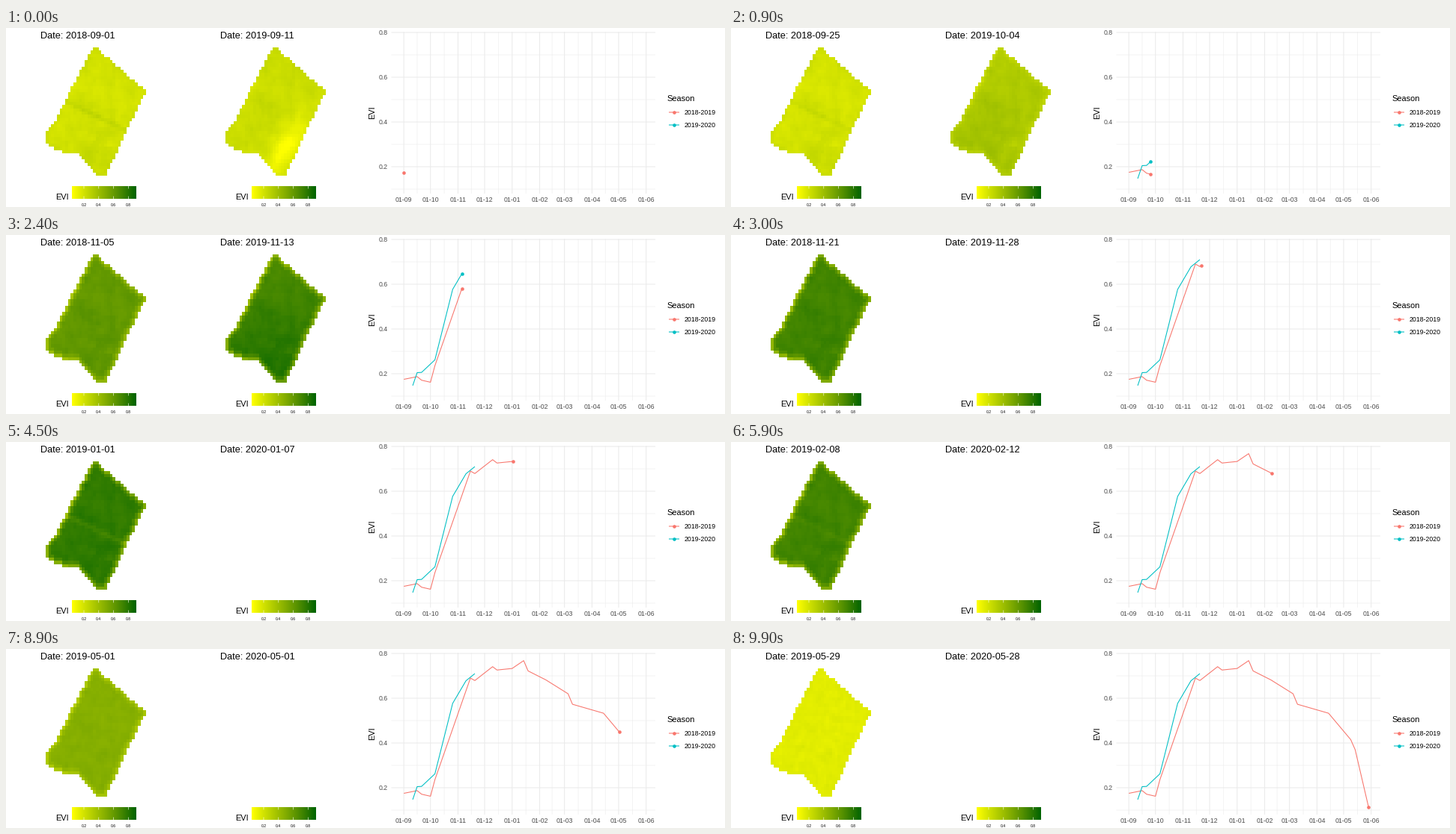
Write a matplotlib script that moves like this. It is 960 px wide and 240 px high and loops after 10000 ms.

```python
import numpy as np
import matplotlib.pyplot as plt
from matplotlib.animation import FuncAnimation
from matplotlib.path import Path

DPI, PT = 96, 0.75  # PT: points per pixel
FRAMES, INTERVAL = 100, 100
RED, TEAL = "#F8766D", "#00BFC4"
GRID, TICK = "#EBEBEB", "#4D4D4D"
plt.rcParams["font.family"] = "Liberation Sans"

# Turning points of each season: days since 1 September, EVI
SEASON_A = np.array([
    (0, .175), (15, .187), (20, .171), (30, .162), (35, .236), (75, .69),
    (80, .679), (100, .741), (105, .726), (122, .733), (135, .768),
    (140, .722), (160, .682), (185, .62), (190, .573), (225, .533),
    (250, .415), (255, .37), (270, .115)])
SEASON_B = np.array([(10, .147), (15, .205), (20, .206), (35, .262),
                     (55, .577), (70, .678), (80, .71)])

# Field outline and raster, in pixels
X0, Y0, CW, CH, COLS, ROWS = 53, 26, 3.72, 4.3, 36, 40
OUTLINE = [(118, 24), (180, 79), (188, 81), (188, 89), (181, 96),
           (133, 198.5), (124, 198.5), (97, 170), (66, 164), (53, 152),
           (52, 140), (61, 133), (114, 29)]
EVI_MIN, EVI_MAX = 0.04, 0.907


def evi_rgb(v):
    """Yellow to dark green."""
    t = np.clip((np.asarray(v) - EVI_MIN) / (EVI_MAX - EVI_MIN), 0, 1)
    return np.stack([(1 - t) * (1 + .3 * t * t), 1 - .61 * t, 0 * t], -1)


def erode(m):
    p = np.pad(m, 1)
    return m & p[:-2, 1:-1] & p[2:, 1:-1] & p[1:-1, :-2] & p[1:-1, 2:]


def noise(passes):
    a = rng.normal(size=gx.shape)
    for _ in range(passes):
        a = (2 * a + sum(np.roll(a, s, ax) for s in (-1, 1) for ax in (0, 1))) / 6
    return a / a.std()


def bump(cx, cy, sx, sy, lean=0):
    u, w = gx - cx, gy - cy
    return np.exp(-((u + lean * w) / sx) ** 2 - (w / sy) ** 2)


gx, gy = np.meshgrid(X0 + CW * (np.arange(COLS) + .5),
                     Y0 + CH * (np.arange(ROWS) + .5))
inside = Path(OUTLINE).contains_points(
    np.c_[gx.ravel(), gy.ravel()]).reshape(gx.shape)
core = erode(inside)
rim, ring = inside & ~core, core & ~erode(core)
left_side = gx < 118 - (gy - 26) * .25

# Share of the seasonal growth reached by each cell
vigour = np.full(gx.shape, 1.03)
vigour[ring] = .9
vigour[rim] = np.where(left_side, .46, .58)[rim]

rng = np.random.default_rng(4)
fine, broad, late = noise(1), noise(5), noise(1)
stripe = np.exp(-((gy - 98 - (gx - 80) * .49) / 4) ** 2)
dry_patch = bump(133, 160, 20, 38, lean=.45)
corner = bump(112, 178, 28, 24)


def field(mean, day):
    bare = min(mean, .17)
    fade = np.interp(day, [200, 270], [1, .2])
    texture = .013 * broad + .008 * fine + .015 * rim
    return (bare + .025 + (mean - bare) * vigour
            + texture * fade + .011 * late * (1 - fade))


def field_a(day):
    band = np.interp(day, [0, 81, 122, 200], [.06, 0, -.06, 0])
    low = np.interp(day, [38, 70], [.035, 0])
    return (field(np.interp(day, *SEASON_A.T), day)
            + band * stripe + low * corner)


def field_b(day):
    dry = np.interp(day, [10, 42], [.2, 0])
    slope = np.interp(day, [10, 46], [0, .05])
    return (field(np.interp(day + 6, *SEASON_B.T), day)
            - dry * dry_patch + slope * (gy - 110) / 60)


def px(day):
    return 531.2 + 1.185 * np.asarray(day)


def py(evi):
    return 246 - 300 * np.asarray(evi)


fig = plt.figure(figsize=(10, 2.5), dpi=DPI, facecolor="white")
ax = fig.add_axes([0, 0, 1, 1])
ax.axis("off")


def label(x, y, s, size, color="black", **kw):
    kw.setdefault("va", "baseline")
    return ax.text(x, y, s, fontsize=size * PT, color=color, **kw)


def line(xs, ys, color, width=1.07):
    return ax.plot(xs, ys, color=color, lw=width * PT, snap=False,
                   solid_capstyle="butt")[0]


def dot(x, y, color):
    return ax.plot(x, y, "o", color=color, ms=4.6 * PT, mew=0, snap=False)[0]


def image(rgb, x0, x1, y0, y1):
    return ax.imshow(rgb, extent=(x0, x1, y1, y0), aspect="auto",
                     interpolation="nearest")


def map_panel(dx):
    title = label(46 + dx, 14, "", 12.8)
    im = image(np.zeros((ROWS, COLS, 4)), X0 + dx, X0 + dx + COLS * CW,
               Y0, Y0 + ROWS * CH)
    label(66 + dx, 230, "EVI", 11)
    image(evi_rgb(np.linspace(EVI_MIN, EVI_MAX, 86))[None],
          88 + dx, 174 + dx, 212, 229)
    for v in (.2, .4, .6, .8):
        x = 104 + dx + (v - .2) * 99
        for y in (212, 225.6):
            line([x, x], [y, y + 3.4], "white", .6)
        label(x, 239, f"{v:.1f}", 5, ha="center")
    return title, im


def grid_x(day, width):
    line([px(day)] * 2, [5, 222], GRID, width)


def grid_y(evi, width):
    line([514.5, 867], [py(evi)] * 2, GRID, width)


def chart():
    months = np.arange("2018-09", "2019-07", dtype="datetime64[M]")
    days = (months.astype("datetime64[D]") - np.datetime64("2018-09-01")).astype(int)
    for d in (days[1:] + days[:-1]) / 2:
        grid_x(d, .55)
    for v in (.1, .3, .5, .7):
        grid_y(v, .55)
    for d, month in zip(days, months):
        grid_x(d, 1.07)
        label(px(d), 233, f"01-{str(month)[-2:]}", 8.8, TICK, ha="center")
    for v in (.2, .4, .6, .8):
        grid_y(v, 1.07)
        label(510, py(v) + 3.2, f"{v:.1f}", 8.8, TICK, ha="right")
    label(489, 113.5, "EVI", 11, rotation=90, ha="center", va="center")
    label(882.5, 98, "Season", 11)
    for y, name, color in ((113, "2018-2019", RED), (130, "2019-2020", TEAL)):
        line([885, 899], [y, y], color)
        dot([892], [y], color)
        label(905.5, y + 3.2, name, 8.8)


title_a, map_a = map_panel(0)
title_b, map_b = map_panel(240)
chart()
curves = [(data, line([], [], c), dot([], [], c))
          for data, c in ((SEASON_A, RED), (SEASON_B, TEAL))]
ax.set_xlim(0, 960)
ax.set_ylim(240, 0)


def reveal(data, path, tip, now):
    days, evi = data.T
    seen = days <= now
    xs, ys = days[seen], evi[seen]
    live = days[0] <= now <= days[-1]
    if live:
        xs, ys = np.append(xs, now), np.append(ys, np.interp(now, days, evi))
    path.set_data(px(xs), py(ys))
    tip.set_data(px(xs[-1:]) if live else [], py(ys[-1:]) if live else [])


def paint(im, values, shown=True):
    im.set_data(np.dstack([evi_rgb(values), (inside & shown).astype(float)]))


def draw(i):
    last = FRAMES - 1
    day_a, day_b = 270 * i // last, 260 * i // last
    title_a.set_text(f"Date: {np.datetime64('2018-09-01') + day_a}")
    title_b.set_text(f"Date: {np.datetime64('2019-09-11') + day_b}")
    paint(map_a, field_a(day_a))
    paint(map_b, field_b(10 + day_b), 10 + day_b <= 80)
    for data, path, tip in curves:
        reveal(data, path, tip, 270 * i / last)
    return []


anim = FuncAnimation(fig, draw, frames=FRAMES, interval=INTERVAL,
                     repeat=True, repeat_delay=0)
plt.show()
```
